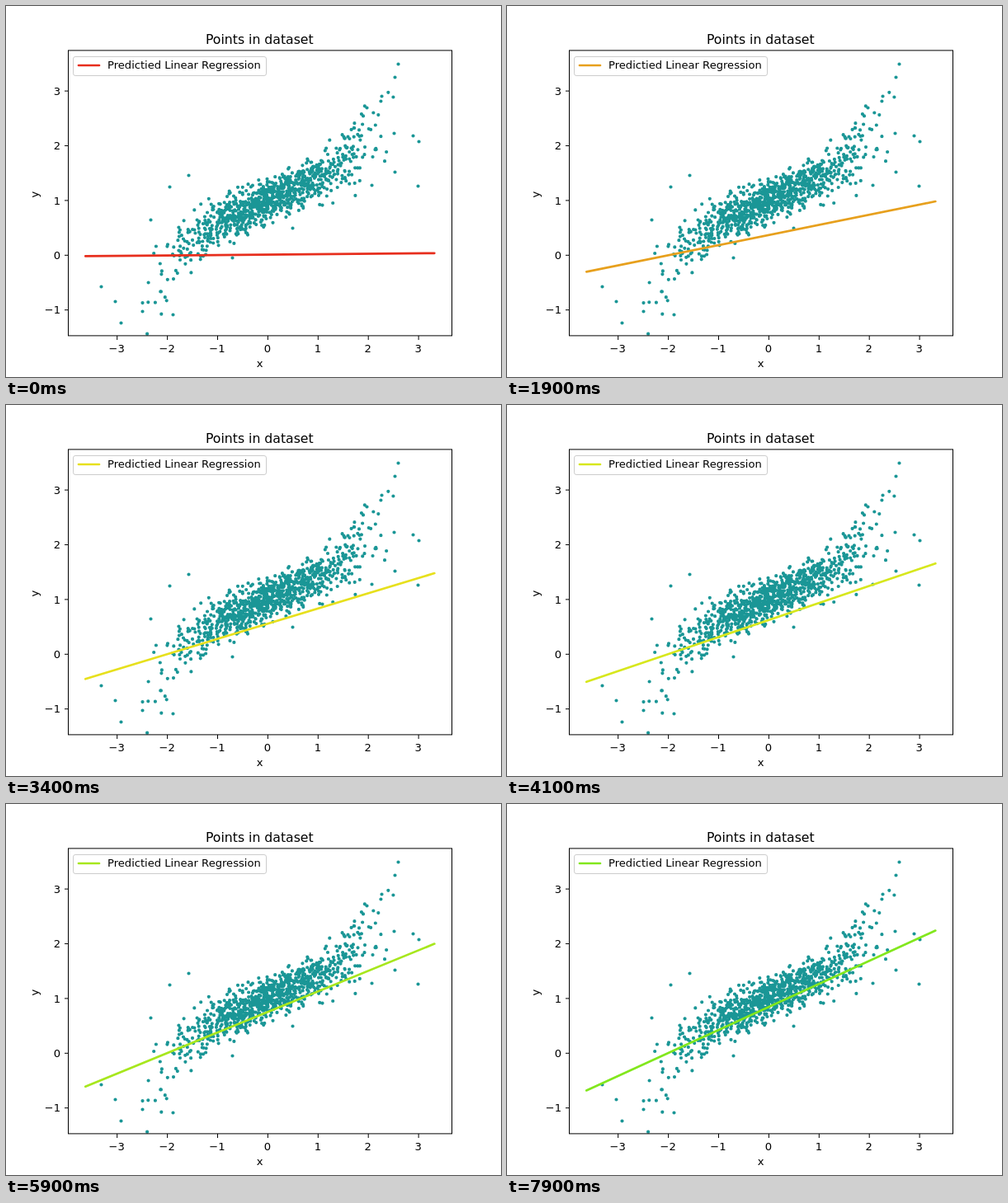
These frames come from a looping animation (600 px wide and 450 px high, 8000 ms). An HTML page:

```html
<!DOCTYPE html>
<html lang="en">
<head>
<meta charset="utf-8">
<title>Linear regression fit</title>
<style>
html, body { margin: 0; width: 100%; height: 100%; overflow: hidden; background: #fff; }
svg { display: block; width: 600px; height: 450px; }
text { font: 13.1px "DejaVu Sans", sans-serif; text-anchor: middle; }
.title { font-size: 15.7px; }
.end { text-anchor: end; }
.start { text-anchor: start; }
path { fill: none; stroke-linecap: round; }
#axes path { stroke: #000; stroke-linecap: butt; }
</style>
</head>
<body>
<svg viewBox="0 0 600 450">
  <path id="dots" stroke="#1a9696" stroke-width="4.2"/>
  <path id="fit" stroke-width="2.7"/>
  <rect x="75.5" y="53.9" width="465" height="346" fill="none" stroke="#000"/>
  <g id="axes"></g>
  <text class="title" x="307.3" y="46">Points in dataset</text>
  <text x="307.5" y="437.5">x</text>
  <text transform="translate(39 228.7) rotate(-90)">y</text>
  <rect x="81.5" y="61.5" width="234" height="23" rx="2.6" fill="#fff" fill-opacity=".8" stroke="#ccc"/>
  <path id="key" d="M88 72H113" stroke-width="2.7"/>
  <text class="start" x="123" y="76.3">Predictied Linear Regression</text>
</svg>
<script>
const $ = id => document.getElementById(id);
const px = x => 317.4 + 60.9 * x;
const py = y => 302.3 - 66.4 * y;

// Tick marks and labels
let ticks = '';
const label = n => n < 0 ? '\u2212' + -n : n;
for (let n = -3; n <= 3; n++) {
  const x = px(n);
  ticks += `<path d="M${x} 400v5"/><text x="${x - .5}" y="419.5">${label(n)}</text>`;
}
for (let n = -1; n <= 3; n++) {
  const y = py(n);
  ticks += `<path d="M75 ${y}h-4"/><text class="end" x="66" y="${y + 4.6}">${label(n)}</text>`;
}
$('axes').innerHTML = ticks;

// Seeded random numbers
let seed = 12345;
const random = () => (seed = (seed * 1664525 + 1013904223) % 4294967296) / 4294967296;
const normal = () => Math.sqrt(-2 * Math.log(1 - random())) * Math.cos(2 * Math.PI * random());

// A slightly cubic cloud whose spread grows outwards, plus its most distant points
const outliers = [
  [115, 340], [132, 358], [139, 384], [165, 370], [202, 374], [175, 259], [198, 219], [221, 205],
  [274, 305], [347, 269], [443, 217], [437, 123], [455, 109], [471, 86], [475, 70], [470, 154],
  [493, 157], [500, 164], [499, 218], [471, 201]
];
let dots = '';
const addDot = (x, y) => dots += `M${x.toFixed(1)} ${y.toFixed(1)}h.01`;
for (const [x, y] of outliers) addDot(x + .5, y + .5);
for (let count = 0; count < 980;) {
  const x = normal(), noise = normal();
  if (Math.abs(x) > 2.5 || Math.abs(noise) > 2.4) continue;
  const spread = .19 + .05 * x * x;
  addDot(px(x), py(1 + .39 * x + .04 * x ** 3 + spread * noise));
  count++;
}
$('dots').setAttribute('d', dots);

// Line and hue settle exponentially, one training step at a time
const settle = (from, change, rate, step) => from + change * (1 - Math.exp(-rate * step));

function draw(step) {
  const left = settle(303.4, 52, .0238, step);
  const right = settle(299.8, -172.6, .0238, step);
  const color = `hsl(${settle(5, 107, .02, step)} 81% 51%)`;
  $('fit').setAttribute('d', `M96.3 ${left}L519.3 ${right}`);
  $('fit').setAttribute('stroke', color);
  $('key').setAttribute('stroke', color);
}

const start = performance.now();
function tick() {
  draw(Math.floor((performance.now() - start) % 8000 / 100));
  requestAnimationFrame(tick);
}
tick();
</script>
</body>
</html>
```
